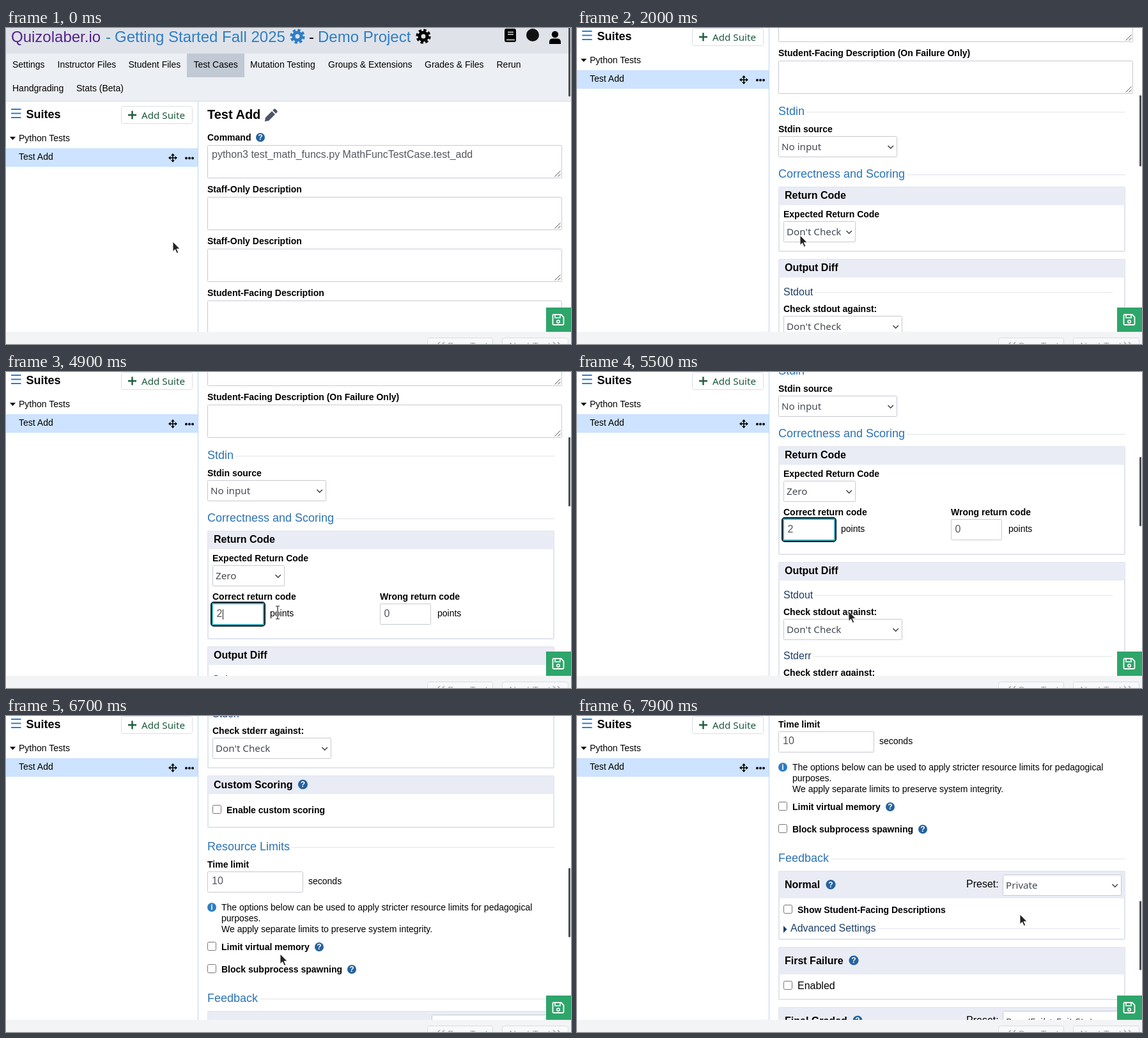
Animation of 884 by 494 pixels, one loop 8 s. Source, as an HTML page:

```html
<!DOCTYPE html>
<html lang="en">
<head>
<meta charset="utf-8">
<title>Test case editor</title>
<style>
html, body { margin: 0; width: 100%; height: 100%; overflow: hidden; background: #fff; }
svg { display: block; width: 884px; height: 494px; }
text { font: 14px "Liberation Sans", Arial, sans-serif; fill: #000; white-space: pre; }
.b { font-weight: bold; }
.brand { font-size: 24px; }
.link { fill: #2f7dc6; }
.title { font-size: 20px; font-weight: bold; }
.h18 { font-size: 18px; font-weight: bold; }
.h16 { font-size: 16px; font-weight: bold; }
.t16 { font-size: 16px; }
.sec { font-size: 18px; fill: #2b72b5; }
.sub { font-size: 16px; fill: #1f3f68; }
.val { font-size: 16px; fill: #53575e; }
.opt { font: 15.2px "Noto Sans", "Open Sans", sans-serif; fill: #454a52; }
.add { font: 500 15.2px "Noto Sans", "Open Sans", sans-serif; fill: #1d5b3d; }
.nav { font: 15.2px "Noto Sans", "Open Sans", sans-serif; fill: #a6aab1; }
.mark { font-size: 12px; font-weight: bold; fill: #fff; text-anchor: middle; }
</style>
</head>
<body>
<svg id="stage" viewBox="0 0 884 494"></svg>
<script>
(() => {
const NS = 'http://www.w3.org/2000/svg';
const stage = document.getElementById('stage');

function add(parent, tag, attrs) {
  const el = document.createElementNS(NS, tag);
  for (const k in attrs) el.setAttribute(k, attrs[k]);
  parent.appendChild(el);
  return el;
}
const group = parent => add(parent, 'g', {});
const box = (p, x, y, width, height, fill, more) => add(p, 'rect', { x, y, width, height, fill, ...more });
const outline = (p, x, y, w, h, stroke = '#c6cad2', rx = 1, fill = '#fff') =>
  box(p, x + .5, y + .5, w - 1, h - 1, fill, { stroke, rx });
const path = (p, d, fill, more) => add(p, 'path', { d, fill, ...more });
const line = (p, d, stroke, width = 1) => path(p, d, 'none', { stroke, 'stroke-width': width });
const disc = (p, cx, cy, r, fill, more) => add(p, 'circle', { cx, cy, r, fill, ...more });

function text(p, x, y, str, cls = '') {
  const el = add(p, 'text', { x, y, class: cls });
  el.textContent = str;
  return el;
}
function badge(p, x, y, r = 7, sign = '?', fill = '#25639e') {
  disc(p, x, y, r, fill);
  text(p, x, y + 4.3, sign, 'mark');
}
function area(p, y, label) {
  if (label) text(p, 315, y - 7, label, 'b');
  outline(p, 315, y, 555, 52);
  line(p, `M858.5 ${y + 49.5}l9 -9M863.5 ${y + 49.5}l4 -4`, '#555');
}
function select(p, x, y, w, str) {
  outline(p, x, y, w, 33);
  line(p, `M${x + w - 14.5} ${y + 15}l4.2 4.2l4.2 -4.2`, '#3c4048', 1.5);
  return text(p, x + 5, y + 22, str, 'opt');
}
function section(p, x, y, str, from, to, cls = 'sec') {
  text(p, x, y + 6, str, cls);
  box(p, from, y + 1, to - from, 1, '#e1e4e9');
}
function card(p, y, h, head, str, base) {
  const r = box(p, 316, y + 1, 541, h - 2, '#fff', { stroke: '#e1e4ee', 'stroke-width': 2, rx: 1 });
  box(p, 316, y + 1, 541, head, '#e9ecf5');
  text(p, 325, base, str, 'h16');
  return r;
}
const check = (p, x, y) => box(p, x - 6.5, y - 6.5, 13, 13, '#fff', { stroke: '#767676', rx: 2 });

function gear(p, x, y, color) {
  disc(p, x, y, 9.4, 'none', { stroke: color, 'stroke-width': 4.4, 'stroke-dasharray': '4.2 3.183' });
  disc(p, x, y, 6, 'none', { stroke: color, 'stroke-width': 5 });
}

box(stage, 0, 0, 884, 494, '#fff');
const doc = group(stage);
const side = group(stage);

// Top bar and tabs
const header = group(doc);
box(header, 0, -20, 884, 60, '#dfe3e9');
box(header, 0, 40, 884, 74, '#eceff3');
box(header, 0, 114, 884, 1, '#cfdbe8');
box(header, 283, 40, 90, 37, '#c0c9d4');
text(header, 8, 22, 'Quizolaber.io', 'brand').style.fill = '#55218f';
text(header, 156, 22, '-', 'brand link');
text(header, 170, 22, 'Getting Started Fall 2025', 'brand link');
gear(header, 456, 13, '#2f7dc6');
text(header, 474, 22, '-', 'brand');
text(header, 488, 22, 'Demo Project', 'brand link');
gear(header, 653, 13, '#000');
box(header, 780, 1, 18, 21, '#000', { rx: 3 });
line(header, 'M785 6.5h9M785 10h9M783 18.5h13', '#dfe3e9', 1.6);
disc(header, 824, 11, 10, '#111');
disc(header, 859, 10, 5.2, '#000');
path(header, 'M850 25v-3q0 -5.5 5.5 -5.5h7q5.5 0 5.5 5.5v3z', '#000');
[['Settings', 10], ['Instructor Files', 80.5], ['Student Files', 191.5], ['Test Cases', 293.5],
 ['Mutation Testing', 382], ['Groups & Extensions', 504], ['Grades & Files', 655], ['Rerun', 767.5]]
  .forEach(([s, x]) => text(header, x, 62, s));
text(header, 10, 99, 'Handgrading');
text(header, 110, 99, 'Stats (Beta)');

// Suite list
box(side, 300, 115, 1, 600, '#bcd6ec');
[127, 133.5, 140].forEach(y => box(side, 8, y - 1, 15.5, 2, '#2f7dc6'));
text(side, 31.5, 141, 'Suites', 'h18');
outline(side, 180, 122, 112, 28, '#dadee5', 3);
line(side, 'M191 136h13M197.5 129.5v13', '#1d5b3d', 2.4);
text(side, 212, 142, 'Add Suite', 'add');
path(side, 'M6 170h9l-4.5 5z', '#000');
text(side, 20, 177, 'Python Tests');
box(side, 0, 188, 300, 29, '#cde3ff');
text(side, 20, 206, 'Test Add');
line(side, 'M255 203h12M261 197v12', '#000', 1.6);
path(side, 'M254 203l3.5 -3v6zM268 203l-3.5 -3v6zM261 196l-3 3.5h6zM261 210l-3 -3.5h6z', '#000');
[282, 287, 292].forEach(x => disc(side, x, 203.5, 2, '#000'));

// Form, upper part
text(doc, 315, 142, 'Test Add', 'title');
path(doc, 'M405 145l1 -5l10 -10l5 5l-10 10l-6 1zM417.2 128.8l2 -2q1.3 -1 2.6 0l2.4 2.4q1 1.3 0 2.6l-2 2z', '#4c5566');
text(doc, 315, 176, 'Command', 'b');
badge(doc, 398, 171);
area(doc, 183);
text(doc, 322, 203, 'python3 test_math_funcs.py MathFuncTestCase.test_add', 'val');
area(doc, 264, 'Staff-Only Description');
area(doc, 345, 'Staff-Only Description');
area(doc, 426, 'Student-Facing Description');
area(doc, 507, 'Student-Facing Description (On Failure Only)');
section(doc, 315, 586, 'Stdin', 359, 858);
text(doc, 315, 619, 'Stdin source', 'b');
select(doc, 315, 625, 186, 'No input');
section(doc, 315, 684, 'Correctness and Scoring', 516, 858);
const codeCard = card(doc, 704, 102, 28, 'Return Code', 723);
text(doc, 323, 752, 'Expected Return Code', 'b');
const expected = select(doc, 323, 758, 113, "Don't Check");

// Points fields, shown once a return code is expected
const points = group(doc);
text(points, 323, 812, 'Correct return code', 'b');
text(points, 585, 812, 'Wrong return code', 'b');
outline(points, 323, 818, 80, 33);
outline(points, 585, 818, 80, 33);
const ring = group(points);
box(ring, 321, 816, 84, 37, '#fff', { stroke: '#0d1a22', 'stroke-width': 2, rx: 4 });
box(ring, 323, 818, 80, 33, '#fff', { stroke: '#35a7b8', 'stroke-width': 2, rx: 1 });
const picked = box(points, 330, 825, 9, 18, '#a9cdf5');
const score = text(points, 329.5, 839, '0', 'val');
const caret = box(points, 339, 827, 1, 16, '#222');
text(points, 591.5, 839, '0', 'val');
text(points, 413, 838, 'points');
text(points, 675, 838, 'points');

// Form, lower part
const tail = group(doc);
card(tail, 885, 232, 28, 'Output Diff', 904);
[['Stdout', 936, 372], ['Stderr', 1031, 369]].forEach(([s, y, from]) => {
  section(tail, 323, y, s, from, 838, 'sub');
  text(tail, 323, y + 32, `Check ${s.toLowerCase()} against:`, 'b');
  select(tail, 323, y + 38, 186, "Don't Check");
});
card(tail, 1128, 82, 28, 'Custom Scoring', 1148);
badge(tail, 464.5, 1142, 7.6);
check(tail, 330, 1181);
text(tail, 345, 1187, 'Enable custom scoring', 'b');
section(tail, 315, 1239, 'Resource Limits', 447, 858);
text(tail, 315, 1272, 'Time limit', 'b');
outline(tail, 315, 1278, 150, 33);
text(tail, 322, 1298, '10', 'val');
text(tail, 473, 1298, 'seconds');
badge(tail, 322, 1334, 7, 'i', '#2f7dc6');
['The options below can be used to apply stricter resource limits for pedagogical', 'purposes.',
 'We apply separate limits to preserve system integrity.']
  .forEach((s, i) => text(tail, 337, 1339 + 17 * i, s));
[['Limit virtual memory', 1396, 490], ['Block subprocess spawning', 1431, 541]].forEach(([s, y, x]) => {
  check(tail, 322, y - 1);
  text(tail, 337, y + 5, s, 'b');
  badge(tail, x, y);
});
section(tail, 315, 1476, 'Feedback', 397, 858);

card(tail, 1496, 108, 42, 'Normal', 1523);
badge(tail, 397, 1517.5, 7.6);
text(tail, 609, 1522, 'Preset:', 't16');
select(tail, 666, 1502, 186, 'Private');
check(tail, 330, 1556);
text(tail, 345, 1562, 'Show Student-Facing Descriptions', 'b');
path(tail, 'M323 1582l5.5 5.5l-5.5 5.5z', '#1f3f68');
section(tail, 334, 1585, 'Advanced Settings', 471, 850, 'sub');
card(tail, 1615, 83, 42, 'First Failure', 1642);
badge(tail, 433, 1636, 7.6);
check(tail, 330, 1675);
text(tail, 345, 1681, 'Enabled', 't16');
card(tail, 1709, 110, 42, 'Final Graded', 1736);
badge(tail, 439, 1730, 7.6);
text(tail, 609, 1735, 'Preset:', 't16');
select(tail, 666, 1715, 186, 'Pass/Fail + Exit Status');

// Fixed overlays
const thumb = box(stage, 880, 0, 3, 111, '#4b4d50', { rx: 1 });
box(stage, 845, 437, 39, 38, '#2ea56a');
path(stage, 'M857 448h11.5l4 4v10.5q0 1.5 -1.5 1.5h-14q-1.5 0 -1.5 -1.5v-13q0 -1.5 1.5 -1.5z',
  'none', { stroke: '#fff', 'stroke-width': 1.8 });
line(stage, 'M859 448.5v4.5h8v-4.5', '#fff', 1.6);
disc(stage, 864, 459, 2.2, 'none', { stroke: '#fff', 'stroke-width': 1.6 });
box(stage, 0, 475, 884, 19, '#f3f4f6');
outline(stage, 659, 484, 103, 30, '#d9dce1', 3, '#f8f9fa');
outline(stage, 776, 484, 104, 30, '#d9dce1', 3, '#f8f9fa');
line(stage, 'M679 491l-5 5M686 491l-5 5M856 491l5 5M863 491l5 5', '#a6aab1', 1.5);
text(stage, 691, 502, 'Prev Test', 'nav');
text(stage, 787, 502, 'Next Test', 'nav');

// Drop-down list
const menu = group(stage);
outline(menu, 322, 334, 115, 93, '#c4c6ca', 4);
const hover = box(menu, 328, 340, 103, 27, '#e2e4e8', { rx: 3 });
["Don't Check", 'Zero', 'Nonzero'].forEach((s, i) => text(menu, 334, 359 + 27 * i, s, 'opt'));

// Pointers
const arrow = path(stage, 'M0 0v15.5l3.6 -3.3l2.7 6l2.5 -1.1l-2.7 -5.8h4.9z', '#222',
  { stroke: '#fff', 'stroke-width': .9 });
const beam = group(stage);
const beamPath = 'M-3 -10h2q1 0 1 1.2q0 -1.2 1 -1.2h2M0 -9v18M-3 10h2q1 0 1 -1.2q0 1.2 1 1.2h2';
line(beam, beamPath, '#fff', 3);
line(beam, beamPath, '#222', 1.2);

// Tracks: time, value, time, value ...
const scrolled = [600, 0, 800, 62, 1000, 172, 1300, 368, 1500, 456, 5200, 456, 5400, 515, 5700, 735, 5900, 793,
  6100, 796, 6300, 850, 6700, 1035, 7000, 1110, 7500, 1225, 7900, 1254];
const mouseX = [1000, 261, 1500, 276, 1800, 335, 2000, 349, 2300, 349, 2600, 348, 2900, 348, 3000, 350, 4500, 350,
  4900, 425, 6200, 425, 6700, 429, 7100, 433, 7900, 693];
const mouseY = [1500, 334, 1800, 316, 2000, 324, 2300, 324, 2600, 375, 2900, 375, 3000, 377, 4500, 377,
  4900, 376, 5200, 376, 5300, 374, 6200, 374, 6700, 372, 7100, 370, 7900, 310];
const barAlpha = [0, 1, 200, 0, 600, 0, 700, 1, 3900, 1, 4200, 0, 4400, 0, 4600, 1];

function at(track, t) {
  if (t <= track[0]) return track[1];
  for (let i = 2; i < track.length; i += 2) {
    if (t <= track[i]) {
      const k = (t - track[i - 2]) / (track[i] - track[i - 2]);
      return track[i - 1] + (track[i + 1] - track[i - 1]) * k;
    }
  }
  return track[track.length - 1];
}
const move = (el, x, y) => el.setAttribute('transform', `translate(${x} ${y})`);
const show = (el, on) => { el.style.display = on ? '' : 'none'; };
const say = (el, str) => { if (el.textContent !== str) el.textContent = str; };

function draw(t) {
  const s = Math.round(at(scrolled, t));
  const zero = t >= 3000;
  move(doc, 0, -s);
  move(side, 0, -Math.min(s, 122));

  say(expected, zero ? 'Zero' : "Don't Check");
  codeCard.setAttribute('height', zero ? 168 : 100);
  move(tail, 0, zero ? 0 : -68);
  show(points, zero);
  show(ring, t >= 3500);
  show(picked, t >= 3600 && t < 4500);
  say(score, t >= 4500 ? '2' : '0');
  show(caret, t >= 3500 && t < 3600 || t >= 4500 && t < 5400);

  show(menu, t >= 2200 && t < 3000);
  hover.setAttribute('y', t >= 2500 ? 367 : 340);

  thumb.setAttribute('y', zero ? 102 + .2345 * (s - 456) : -4 + .2394 * s);
  thumb.setAttribute('height', zero ? 108 : 111);
  thumb.setAttribute('opacity', at(barAlpha, t));

  const typing = t >= 3000 && t < 5300;
  show(arrow, !typing);
  show(beam, typing);
  move(typing ? beam : arrow, Math.round(at(mouseX, t)), Math.round(at(mouseY, t)));
}

const start = performance.now();
function tick() {
  const t = Math.max(0, performance.now() - start) % 8000;
  draw(Math.floor(t / 100) * 100);
  requestAnimationFrame(tick);
}
tick();
})();
</script>
</body>
</html>
```
